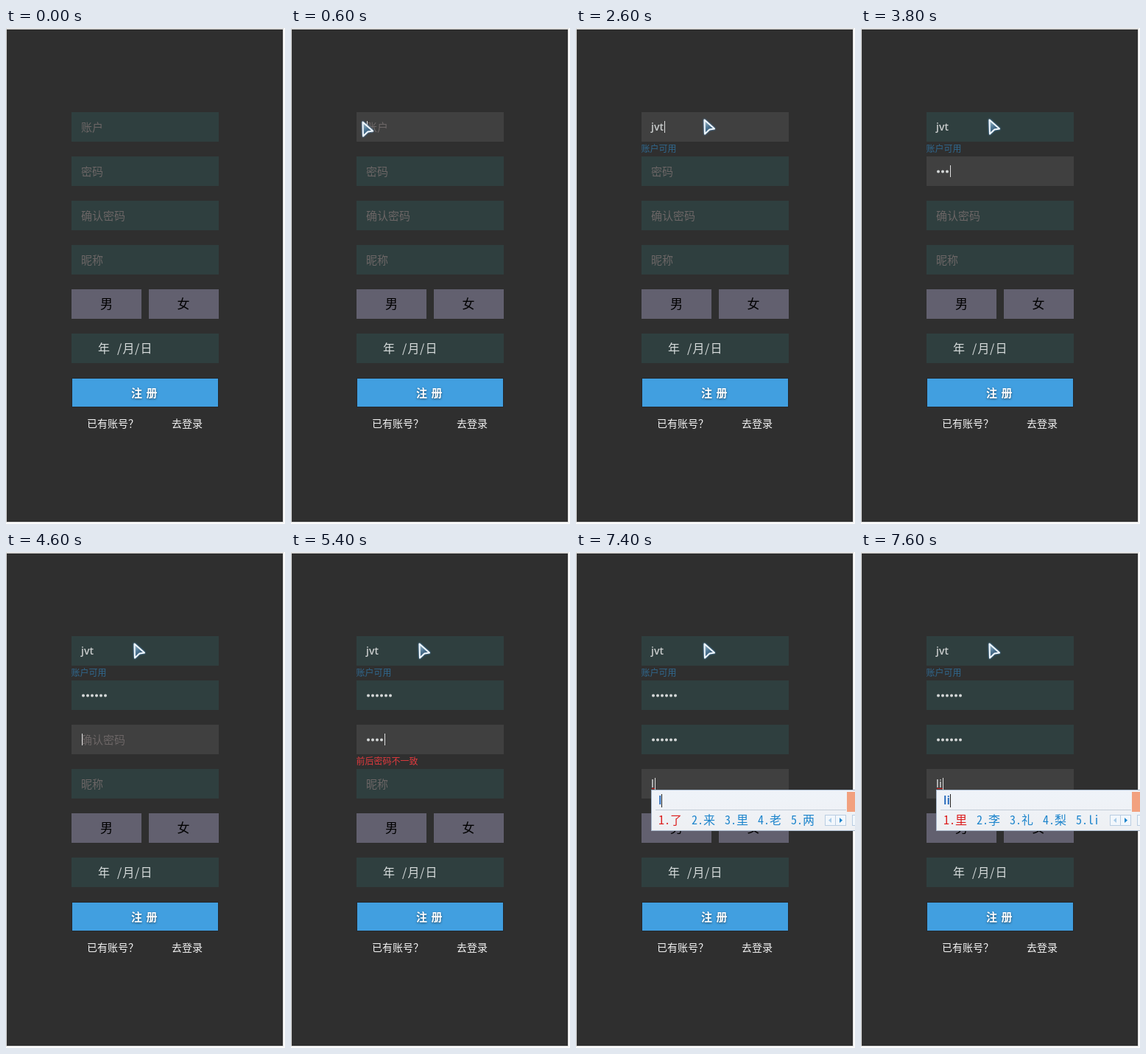
Recreate the animation shown at these times as an HTML page. Size 379 by 672 pixels, loop 8 s.

```html
<!DOCTYPE html>
<html lang="zh-CN">
<head>
<meta charset="utf-8">
<title>注册</title>
<style>
html, body { margin: 0; width: 100%; height: 100%; overflow: hidden; background: #fff; }
svg { display: block; width: 379px; height: 672px; }
text { font-family: "Noto Sans CJK SC", "Noto Sans CJK", sans-serif; white-space: pre; }
.hint { font-size: 12px; }
.ph { font-size: 15px; fill: #6c6666; }
.val { font: 600 14px "Open Sans", "Noto Sans", sans-serif; fill: #c9cccc; }
.sex { font-size: 17px; fill: #000; }
.date { font-size: 16px; font-weight: 300; fill: #d8dddd; }
.btn { font-size: 15px; font-weight: 700; fill: #fff; text-shadow: 0 1px 3px #0008; }
.link { font-size: 14px; font-weight: 500; fill: #f2f2f2; }
.cand { font: 16px "Noto Sans Mono CJK SC", "Noto Sans CJK SC", monospace; fill: #1c84cc; }
.pinyin { font: 600 16px "Open Sans", "Noto Sans", sans-serif; fill: #1a62b8; }
</style>
</head>
<body>
<svg viewBox="0 0 379 672">
  <defs>
    <linearGradient id="steel" x1="0" y1="0" x2="0.6" y2="1">
      <stop offset="0" stop-color="#a9c4d4"/>
      <stop offset="0.55" stop-color="#4b7290"/>
      <stop offset="1" stop-color="#24425c"/>
    </linearGradient>
    <linearGradient id="panel" x1="0" y1="0" x2="0" y2="1">
      <stop offset="0" stop-color="#eff3f9"/>
      <stop offset="1" stop-color="#eef0f3"/>
    </linearGradient>
    <filter id="glow" x="-50%" y="-50%" width="200%" height="200%">
      <feDropShadow dx="0" dy="0" stdDeviation="1.3" flood-color="#4a9ce0"/>
    </filter>
  </defs>
  <rect width="379" height="672" fill="#fbfbfb"/>
  <rect width="377" height="670" fill="#dcdcdc"/>
  <rect x="1" y="2" width="375" height="667" fill="#2f2f2f"/>

  <g id="fields"></g>

  <g fill="#62606f">
    <rect x="89" y="354" width="95" height="40"/>
    <rect x="194" y="354" width="95" height="40"/>
  </g>
  <text class="sex" x="128" y="380">男</text>
  <text class="sex" x="232.5" y="380">女</text>
  <rect x="89" y="414" width="200" height="40" fill="#2f3f3f"/>
  <text class="date" x="125 151 158.5 175 182.5" y="440">年/月/日</text>
  <rect x="89" y="474" width="200" height="40" fill="#23292e"/>
  <rect x="90" y="475" width="198" height="38" fill="#419fe0"/>
  <text class="btn" x="170 190.5" y="500">注册</text>
  <text class="link" x="110" y="541">已有账号？</text>
  <text class="link" x="225" y="541">去登录</text>

  <text id="okHint" class="hint" x="88.5" y="168" fill="#30688e">账户可用</text>
  <text id="badHint" class="hint" x="88.5" y="288" fill="#e03a3e">前后密码不一致</text>
  <rect id="caret" width="1" height="16" fill="#dedede"/>

  <g id="pointer" filter="url(#glow)">
    <path d="M0 0 L13.5 12 L6.8 13 L0.5 19 Z" fill="url(#steel)" stroke="#eef6fc" stroke-width="2" stroke-linejoin="round"/>
  </g>

  <g id="ime">
    <rect id="underline" x="103" y="320" height="1" fill="#d02020"/>
    <rect x="102.5" y="322.5" width="290" height="55" fill="url(#panel)" stroke="#a9b9cc"/>
    <path d="M108 349.5H367" stroke="#c3ccd6"/>
    <text id="pinyin" class="pinyin" x="112" y="342"></text>
    <rect id="imeCaret" y="328" width="1" height="18" fill="#222"/>
    <g id="cands"></g>
    <g fill="#f2f7fc" stroke="#b9cde2">
      <rect x="338.5" y="356.5" width="14" height="14"/>
      <rect x="352.5" y="356.5" width="14" height="14"/>
      <rect x="375.5" y="356.5" width="14" height="14"/>
    </g>
    <path d="M347 360v7l-4 -3.5z" fill="#a8cbe8"/>
    <path d="M358 360v7l4 -3.5z" fill="#1c84cc"/>
    <rect x="368" y="325" width="27" height="27" fill="#f2a17f"/>
  </g>
</svg>
<script>
const LOOP = 8000;
const USER = "jvt";
const LABELS = ["账户", "密码", "确认密码", "昵称"];
const WORDS = { l: "了来里老两", li: ["里", "李", "礼", "梨", "li"] };
const $ = id => document.getElementById(id);

function add(parent, tag, attrs, text = "") {
  const el = document.createElementNS("http://www.w3.org/2000/svg", tag);
  for (const k in attrs) el.setAttribute(k, attrs[k]);
  el.textContent = text;
  return parent.appendChild(el);
}

const set = (el, attrs) => { for (const k in attrs) el.setAttribute(k, attrs[k]); };
const show = (el, on) => { el.style.display = on ? "" : "none"; };

const fields = LABELS.map((label, i) => {
  const y = 114 + 60 * i, g = $("fields");
  const box = add(g, "rect", { x: 89, y, width: 200, height: 40 });
  const hold = add(g, "text", { class: "ph", x: 102, y: y + 25.5 }, label);
  const secret = i === 1 || i === 2;
  const value = secret ? add(g, "g", { fill: "#d3d6d6" })
                       : add(g, "text", { class: "val", x: 102, y: y + 25 });
  const dots = secret
    ? Array.from({ length: 6 }, (_, n) => add(value, "circle", { cx: 105 + 6 * n, cy: y + 80 - 60 + 0.5, r: 2 }))
    : null;
  return { y, box, hold, value, dots };
});

const cands = Array.from({ length: 5 }, (_, i) => {
  const el = add($("cands"), "text", { class: "cand", x: 112 + 45 * i, y: 369 });
  if (!i) el.style.fill = "#dc1c1c";
  return el;
});

// Each step changes only the listed parts of the state.
const start = { pos: null, focus: -1, caret: 0, user: 0, pass: 0, again: 0, nick: "", ok: 0, bad: 0 };
const steps = [
  [200, { pos: [138, 140.5] }],
  [400, { pos: [112, 132] }],
  [600, { pos: [97.5, 127.5], focus: 0, caret: 1 }],
  [1000, { pos: [145, 126] }],
  [1200, { pos: [174.5, 124.5], caret: 0 }],
  [1800, { caret: 1 }],
  [2200, { user: 1 }],
  [2400, { user: 2, ok: 1 }],
  [2600, { user: 3 }],
  [3000, { caret: 0 }],
  [3200, { focus: 1, caret: 1 }],
  ...[2, 3, 4, 5, 6].map((pass, i) => [3600 + 200 * i, { pass }]),
  [4600, { focus: 2 }],
  ...[1, 2, 3, 4, 5, 6].map((again, i) => [4800 + 200 * i, { again, bad: 1 }]),
  [6000, { bad: 0 }],
  [6400, { caret: 0 }],
  [6600, { focus: 3, caret: 1 }],
  [7200, { caret: 0 }],
  [7400, { nick: "l", caret: 1 }],
  [7600, { nick: "li" }]
];

const stateAt = t => steps.reduce((s, [at, change]) => at <= t ? { ...s, ...change } : s, start);

function draw(s) {
  const counts = [s.user, s.pass, s.again, s.nick.length];
  fields[0].value.textContent = USER.slice(0, s.user);
  fields[3].value.textContent = s.nick;
  fields.forEach((f, i) => {
    set(f.box, { fill: s.focus === i ? "#404040" : "#2f3f3f" });
    show(f.hold, !counts[i]);
    if (f.dots) f.dots.forEach((d, n) => show(d, n < counts[i]));
  });

  show($("okHint"), s.ok);
  show($("badHint"), s.bad);
  show($("caret"), s.caret);
  if (s.focus >= 0) {
    const f = fields[s.focus];
    const w = f.dots ? 6 * counts[s.focus] : counts[s.focus] ? f.value.getComputedTextLength() : 0;
    set($("caret"), { x: Math.round(103 + w), y: f.y + 12 });
  }

  show($("pointer"), s.pos);
  if (s.pos) set($("pointer"), { transform: `translate(${s.pos})` });

  show($("ime"), s.nick);
  if (s.nick) {
    $("pinyin").textContent = s.nick;
    set($("imeCaret"), { x: Math.round(112 + $("pinyin").getComputedTextLength()) });
    set($("underline"), { width: 4 * s.nick.length });
    cands.forEach((el, i) => { el.textContent = `${i + 1}.${WORDS[s.nick][i]}`; });
  }
}

const began = performance.now();
function tick() {
  draw(stateAt((performance.now() - began) % LOOP));
  requestAnimationFrame(tick);
}
tick();
</script>
</body>
</html>
```
